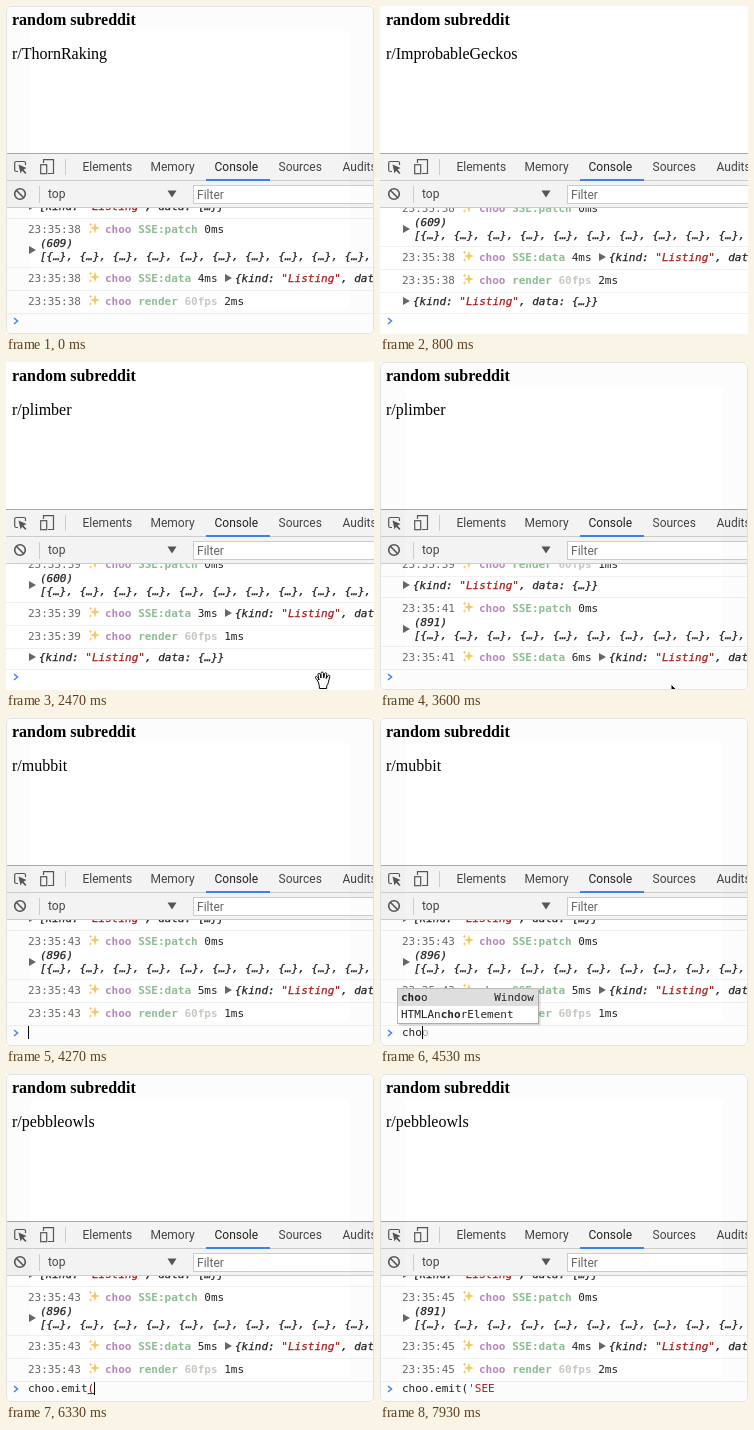
Write an HTML page that moves like this. It is 368 px wide and 328 px high and loops after 8000 ms.

```html
<!DOCTYPE html>
<html lang="en">
<head>
<meta charset="utf-8">
<title>Console demo</title>
<style>
  html, body { margin: 0; width: 100%; height: 100%; overflow: hidden; background: #fff; }
  svg { display: block; width: 368px; height: 328px; }
  text { white-space: pre; font: 11px "DejaVu Sans Mono", monospace; fill: #222; }
  .page { font: 16px "Liberation Serif", serif; fill: #000; }
  .ui { font: 12px Roboto, sans-serif; fill: #444; }
  .b { font-weight: bold; }
  .i { font-style: italic; stroke: #222; stroke-width: .25; }
  .time { fill: #686862; }
  .app { fill: #b985bc; }
  .event { fill: #8cbd92; }
  .fps { fill: #cac7c2; }
  .str { fill: #a61c1a; }
  .i .str { stroke: #a61c1a; }
  .ghost { fill: #aaa; }
  .open { fill: #a61c1a; text-decoration: underline; }
  .icon { fill: none; stroke: #555; stroke-width: 1.2; }
  .tri { fill: #666; }
</style>
</head>
<body>
<svg viewBox="0 0 368 328">
  <defs>
    <clipPath id="view"><rect y="202" width="368" height="126"/></clipPath>
    <g id="sparkle" fill="#f3c865">
      <path d="M89-9.500 90.200-5.200 94-4 90.200-2.800 89 1.500 87.800-2.800 84-4 87.800-5.200Z"/>
      <path d="M84.500-9.500 85.100-8.100 86.500-7.500 85.100-6.900 84.500-5.500 83.900-6.900 82.500-7.500 83.900-8.100Z"/>
      <path d="M84.500-2 85-.5 86.500 0 85 .5 84.500 2 84 .5 82.500 0 84-.5Z"/>
    </g>
  </defs>

  <rect width="368" height="328" fill="#fff"/>
  <text class="page b" x="6" y="19">random subreddit</text>
  <text class="page" id="name" x="6" y="53"></text>

  <g clip-path="url(#view)">
    <g id="log"></g>
    <rect y="308" width="368" height="20" fill="#fff"/>
  </g>

  <path d="M0 147H368V202H0Z" fill="#f3f3f3"/>
  <path d="M0 147.500H368" stroke="#a8a8a8"/>
  <path d="M0 174.500H368M0 201.500H368M59.500 153V169M33.500 180V197" stroke="#ccc"/>
  <path d="M200 174H264" stroke="#4080e0" stroke-width="2"/>
  <g class="icon">
    <path d="M12 165.500H10.500Q8.700 165.500 8.700 164V157Q8.700 155.500 10.200 155.500H18Q19.500 155.500 19.500 157V159"/>
    <path d="M12.500 158.500 20.500 162 17.500 163.500 20.500 167 19.500 168 16 164.700 14.500 167.500Z" fill="#555" stroke="none"/>
    <path d="M37.500 157V153.700H47.500V167.500H42"/>
    <rect x="34.700" y="158.700" width="6" height="9"/>
    <g stroke-width="1.600">
      <circle cx="14" cy="188" r="5.300"/>
      <path d="M10.300 184.300 17.700 191.700"/>
    </g>
  </g>
  <g id="tabs"></g>
  <text class="ui" x="42" y="192">top</text>
  <path d="M161.500 184.500H170.500L166 191.500Z" fill="#555"/>
  <rect x="187.500" y="179.500" width="190" height="18" fill="#fff" stroke="#ccc"/>
  <text class="ui" x="191" y="193" style="fill:#666">Filter</text>

  <path d="M8 312 11.500 315 8 318" fill="none" stroke="#4a84e8" stroke-width="1.500"/>
  <text id="input" x="22" y="318"></text>
  <rect id="caret" y="308" width="1" height="13" fill="#000"/>
  <g id="popup"></g>
  <g id="cursor">
    <path id="arrow" d="M0 0V14L3.200 11 5.300 16 7.700 15 5.600 10.200H10Z" fill="#000" stroke="#fff"/>
    <path id="hand" fill="#fff" stroke="#000" stroke-linejoin="round"
      d="M-3.500 8.500C-4-1-8-1-7.500-3S-4.500-2-4 0L-5-5C-5.300-7-3.200-7.300-2.700-5.500L-2-2-2-6.500C-2-8.500.3-8.500.5-6.500L.7-2 1.500-6C2-8 4-7.500 3.700-5.500L3.200-1.500 4.700-4C5.700-5.700 7.300-4.700 6.700-3 5.500 1 5.500 4 3.700 6V8.500Z"/>
  </g>
  <g id="edge" fill="none">
    <rect width="368" height="328" stroke="#000" stroke-opacity=".01" stroke-width="50"/>
    <rect x=".5" y=".5" width="367" height="327" rx="4" stroke="#e2e2e2"/>
  </g>
</svg>
<script>
const LOOP = 8000, CHAR = 6.62, LEFT = 22, BOTTOM = 307;
const $ = id => document.getElementById(id);
const span = (cls, s, x) => `<tspan class="${cls}"${x === undefined ? '' : ` x="${x}"`}>${s}</tspan>`;
const line = (x, y, body, cls = '') => `<text class="${cls}" x="${x}" y="${y}">${body}</text>`;
const triangle = (x, y) => `<path class="tri" d="M${x} ${y - 4}L${x + 7} ${y}L${x} ${y + 4}Z"/>`;

$('tabs').innerHTML = [[76.5, 'Elements'], [144.5, 'Memory'], [208.5, 'Console'], [272.5, 'Sources'], [336.5, 'Audits']]
  .map(([x, s]) => `<text class="ui" x="${x}" y="165"${s === 'Console' ? ' style="fill:#222"' : ''}>${s}</text>`).join('');

// Console rows: each draws itself into a box of its own height.
const listing = `{kind: ${span('str', '"Listing"')}, data: {…}}`;
const head = (sec, event, rest) =>
  line(LEFT, 15, span('time', `23:35:${sec}`) + span('app b', 'choo', 99) + ' ' + span('event b', event) + ' ' + rest) +
  '<use href="#sparkle" y="14"/>';
const objectRow = () => ({ h: 21, body: triangle(23, 9) + line(33, 13, listing, 'i') });
const patchRow = (sec, size) => ({
  h: 49,
  body: head(sec, 'SSE:patch', '0ms') + triangle(23, 32) +
    line(34, 29, `(${size})`, 'i') + line(34, 42, '[' + '{…}, '.repeat(11), 'i')
});
const dataRow = (sec, ms) => ({
  h: 23,
  body: head(sec, 'SSE:data', ms + 'ms') + triangle(219, 11) + line(229, 15, listing, 'i')
});
const renderRow = (sec, ms) => ({ h: 23, body: head(sec, 'render', span('fps b', '60fps') + ` ${ms}ms`) });

const rows = [[38, 609, 4, 2], [39, 600, 3, 1], [41, 891, 6, 1], [43, 896, 5, 1], [45, 891, 4, 2]]
  .flatMap(([sec, size, dataMs, renderMs]) =>
    [objectRow(), patchRow(sec, size), dataRow(sec, dataMs), renderRow(sec, renderMs)]);
const ends = [0];
$('log').innerHTML = rows.map(({ h, body }, i) => {
  const y = ends[i];
  ends.push(y + h);
  return `<g transform="translate(0 ${y})"><path d="M0 ${h + .5}H368" stroke="#f0f0f0"/>${body}</g>`;
}).join('');

// Completion list standing on the prompt line; the typed part is bold.
function popup({ x, w, query, items }) {
  const top = 305 - items.length * 17;
  const mark = s => query ? s.replace(query, m => span('b', m)) : s;
  return `<rect x="${x - .5}" y="${top - .5}" width="${w + 1}" height="${305 - top + 1}" fill="#fff" stroke="#bbb"/>` +
    `<path d="M${x + 1} 306.500H${x + w + 1.500}V${top + 2}" fill="none" stroke="#0002" stroke-width="2"/>` +
    `<rect x="${x}" y="${top}" width="${w}" height="17" fill="#dedede"/>` +
    items.map(([s, owner], i) => line(x + 3, top + 12 + i * 17, mark(s)) +
      (owner ? `<text x="${x + w - 4}" y="${top + 12 + i * 17}" text-anchor="end">${owner}</text>` : '')).join('');
}
const globals = { x: 18, w: 140, query: 'cho', items: [['choo', 'Window'], ['HTMLAnchorElement']] };
const method = (query, ...names) => ({ x: 51, w: 195, query, items: names.map(s => [s, 'Choo']) });

// Tracks: [start in ms, value], held until the next step.
const tracks = {
  name: [[0, 'ThornRaking'], [800, 'ImprobableGeckos'], [2470, 'plimber'], [4000, 'mubbit'], [6270, 'pebbleowls']],
  shown: [[0, 4], [800, 5], [870, 6], [930, 7], [1070, 8], [2470, 9], [2930, 10], [3130, 11], [4000, 13],
    [4070, 14], [4130, 15], [4200, 16], [6400, 17], [6470, 18], [6530, 19], [6600, 20]],
  typed: [[0, ''], [4400, 'c'], [4470, 'ch'], [4530, 'cho'], [4600, 'choo'], [5000, 'choo.'], [5470, 'choo.e'],
    [5600, 'choo.em'], [5870, 'choo.emi'], [6000, 'choo.emit'], [6270, 'choo.emit('], [6930, "choo.emit('"],
    [7270, "choo.emit('S"], [7330, "choo.emit('SE"], [7400, "choo.emit('SEE"]],
  ghost: [[0, ''], [4530, 'o'], [4600, '']],
  popup: [[0, null], [4530, globals], [4600, { ...globals, query: 'choo', items: [['choo', 'Window']] }], [4730, null],
    [5070, method('', 'emit', 'emitter', 'mount', 'router', 'start', 'state', 'toString', 'use')],
    [5600, method('em', 'emit', 'emitter')], [6000, null]],
  caret: [[0, false], [3130, true], [3600, false], [4000, true], [7930, false]],
  edge: [[0, true], [470, false], [3130, true]],
  cursor: [[0, null], [2000, ['arrow', 133, 20]], [2070, ['arrow', 190, 92]], [2130, ['arrow', 258, 190]],
    [2200, ['arrow', 318, 276]], [2270, ['hand', 338, 312]], [2330, ['hand', 317, 318]],
    [2600, ['hand', 308, 319]], [2730, ['arrow', 291, 322]], [4000, null]]
};
const at = (track, t) => track.findLast(([start]) => start <= t)[1];

const styled = s => s.endsWith('(')
  ? s.slice(0, -1) + span('open', '(')
  : s.replace(/'.*/, m => span('str', m));
const show = (id, on) => $(id).setAttribute('visibility', on ? 'visible' : 'hidden');

let last = '';
function draw() {
  const t = performance.now() % LOOP;
  const now = Object.fromEntries(Object.entries(tracks).map(([key, track]) => [key, at(track, t)]));
  const key = JSON.stringify(now);
  if (key !== last) {
    last = key;
    $('name').textContent = 'r/' + now.name;
    $('log').setAttribute('transform', `translate(0 ${BOTTOM - ends[now.shown]})`);
    $('input').innerHTML = styled(now.typed) + span('ghost', now.ghost);
    $('caret').setAttribute('x', Math.round(LEFT + now.typed.length * CHAR));
    show('caret', now.caret);
    show('edge', now.edge);
    $('popup').innerHTML = now.popup ? popup(now.popup) : '';
    const [shape, x, y] = now.cursor || ['', 0, 0];
    $('cursor').setAttribute('transform', `translate(${x} ${y})`);
    show('arrow', shape === 'arrow');
    show('hand', shape === 'hand');
  }
  requestAnimationFrame(draw);
}
draw();
</script>
</body>
</html>
```
